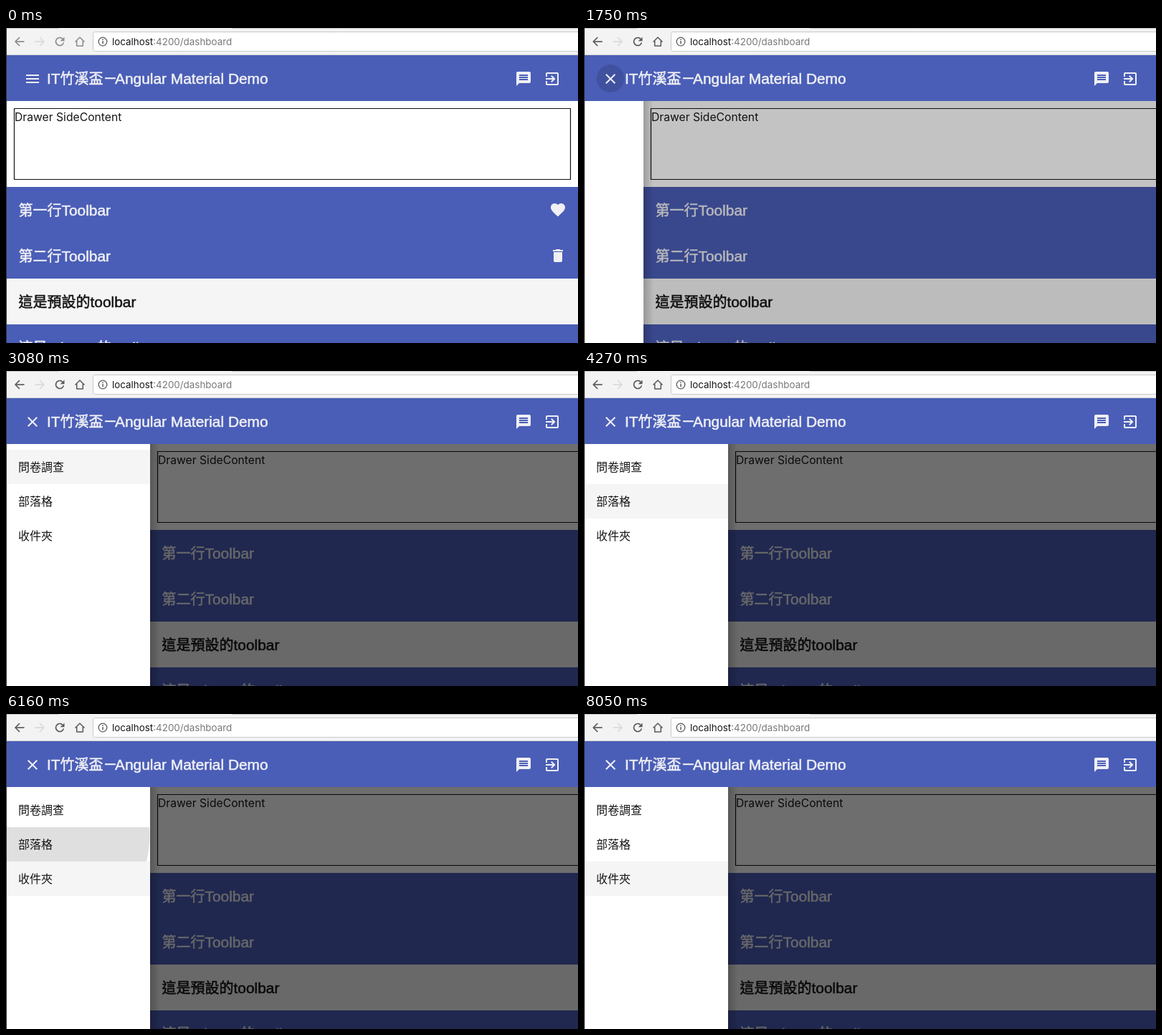
Animation, 798 px wide and 440 px high, one loop 8.12 s. Source, as an HTML page with a canvas:

```html
<!DOCTYPE html>
<html lang="zh-Hant">
<head>
<meta charset="utf-8">
<title>Angular Material Demo</title>
<style>
html, body { margin: 0; width: 100%; height: 100%; overflow: hidden; background: #fff; }
canvas { display: block; }
</style>
</head>
<body>
<canvas id="stage" width="798" height="440"></canvas>
<script>
const ctx = document.getElementById('stage').getContext('2d');
const W = 798, H = 440, LOOP = 8120, STEP = 70;
const BLUE = '#4a5eb7', PALE = '#efeff5', INK = '#161616';
const CJK = '"Noto Sans CJK TC", "Noto Sans CJK", sans-serif';
const SANS = '"Liberation Sans", Arial, sans-serif';
const UI = 'Inter, Roboto, sans-serif';

const ICONS = {
  chat: 'M20 2H4c-1.1 0-2 .9-2 2V22l4-4h14c1.1 0 2-.9 2-2V4c0-1.1-.9-2-2-2zM18 14H6v-2h12zM18 11H6V9h12zM18 8H6V6h12z',
  exit: 'M10.1 15.6L11.5 17l5-5-5-5-1.4 1.4L12.7 11H3v2h9.7zM19 3H5c-1.1 0-2 .9-2 2v4h2V5h14v14H5v-4H3v4c0 1.1.9 2 2 2h14c1.1 0 2-.9 2-2V5c0-1.1-.9-2-2-2z',
  heart: 'M12 21.4l-1.5-1.3C5.4 15.4 2 12.3 2 8.5 2 5.4 4.4 3 7.5 3c1.7 0 3.4.8 4.5 2.1C13.1 3.8 14.8 3 16.5 3 19.6 3 22 5.4 22 8.5c0 3.8-3.4 6.9-8.6 11.5z',
  trash: 'M6 19c0 1.1.9 2 2 2h8c1.1 0 2-.9 2-2V7H6zM19 4h-3.5l-1-1h-5l-1 1H5v2h14z'
};
for (const name in ICONS) ICONS[name] = new Path2D(ICONS[name]);

const ITEMS = ['問卷調查', '部落格', '收件夾'];
const HOVER = [2590, 4130, 6090];

const clamp = v => Math.max(0, Math.min(1, v));

function bezier(x1, y1, x2, y2) {
  const at = (a, b, u) => 3 * a * u * (1 - u) ** 2 + 3 * b * u * u * (1 - u) + u ** 3;
  return x => {
    x = clamp(x);
    if (x === 0 || x === 1) return x;
    let lo = 0, hi = 1;
    for (let i = 0; i < 24; i++) {
      const mid = (lo + hi) / 2;
      if (at(x1, x2, mid) < x) lo = mid; else hi = mid;
    }
    return at(y1, y2, lo);
  };
}
const slide = bezier(.25, .8, .25, 1);
const spread = bezier(0, 0, .2, 1);

function rect(x, y, w, h, fill) {
  ctx.fillStyle = fill;
  ctx.fillRect(x, y, w, h);
}

function line(points, color, width) {
  ctx.beginPath();
  points.forEach(([x, y], i) => i ? ctx.lineTo(x, y) : ctx.moveTo(x, y));
  ctx.strokeStyle = color;
  ctx.lineWidth = width;
  ctx.stroke();
}

function icon(name, x, y) {
  ctx.save();
  ctx.translate(x, y);
  ctx.fillStyle = PALE;
  ctx.fill(ICONS[name], 'evenodd');
  ctx.restore();
}

function text(str, x, y, font, color) {
  ctx.font = font;
  ctx.fillStyle = color;
  ctx.fillText(str, x, y);
  return x + ctx.measureText(str).width;
}

// Medium-weight heading with Latin and Chinese runs
function heading(str, x, y, color) {
  ctx.strokeStyle = color;
  ctx.lineWidth = .55;
  ctx.lineJoin = 'round';
  for (const run of str.match(/[\x20-\x7e]+|[^\x20-\x7e]+/g)) {
    const latin = run.charCodeAt(0) < 128;
    const end = text(run, x, y, latin ? '20.9px ' + SANS : '20px ' + CJK, color);
    ctx.strokeText(run, x, y);
    x = end;
  }
}

// Expands for 450 ms, then fades for 400 ms
function ripple(t, start, x, y, radius, alpha) {
  const dt = t - start;
  if (dt <= 0 || dt >= 850) return;
  ctx.beginPath();
  ctx.arc(x, y, radius * spread(dt / 450), 0, Math.PI * 2);
  ctx.fillStyle = `rgba(0,0,0,${alpha * (1 - clamp((dt - 450) / 400))})`;
  ctx.fill();
}

function browserBar(t) {
  const dark = t < STEP ? '#8c8c8c' : '#5a5a5a';
  rect(0, 0, W, 38, '#f3f3f3');
  rect(0, 0, 74, 1, '#c6c6c6');
  rect(315, 0, W - 315, 1, '#c6c6c6');
  rect(0, 37, W, 1, '#d2d2d2');

  ctx.beginPath();
  ctx.roundRect(121.5, 5.5, 700, 27, 3);
  ctx.fillStyle = '#fff';
  ctx.fill();
  ctx.strokeStyle = '#c9c9c9';
  ctx.lineWidth = 1;
  ctx.stroke();

  for (const [x, dir, color] of [[19, 1, dark], [47, -1, '#dadada']]) {
    line([[x - 6 * dir, 19], [x + 6.5 * dir, 19]], color, 1.7);
    line([[x, 13], [x - 6 * dir, 19], [x, 25]], color, 1.7);
  }

  ctx.beginPath();
  ctx.arc(75, 19, 5.5, .25, Math.PI * 1.75);
  ctx.strokeStyle = dark;
  ctx.lineWidth = 1.7;
  ctx.stroke();
  ctx.beginPath();
  ctx.moveTo(81.5, 12.5);
  ctx.lineTo(81.5, 18.3);
  ctx.lineTo(75.7, 18.3);
  ctx.fillStyle = dark;
  ctx.fill();

  line([[96.5, 19.5], [103, 13], [109.5, 19.5]], dark, 1.5);
  line([[98.7, 18], [98.7, 25], [107.3, 25], [107.3, 18]], dark, 1.5);

  ctx.beginPath();
  ctx.arc(135, 19, 5.8, 0, Math.PI * 2);
  ctx.strokeStyle = '#5a5a5a';
  ctx.lineWidth = 1.3;
  ctx.stroke();
  rect(134.3, 18, 1.5, 4.2, '#5a5a5a');
  rect(134.3, 15.4, 1.5, 1.6, '#5a5a5a');

  const x = text('localhost', 148, 24, '13.4px ' + UI, INK);
  text(':4200/dashboard', x, 24, '13.4px ' + UI, '#777');
}

function header(t, open) {
  rect(0, 38, W, 64, BLUE);
  ctx.save();
  ctx.beginPath();
  ctx.arc(37, 70.5, 20, 0, Math.PI * 2);
  ctx.clip();
  ripple(t, 1600, 37, 70.5, 28.3, .13);
  ctx.restore();

  if (open) {
    line([[30.7, 64.7], [43.3, 77.3]], PALE, 2);
    line([[43.3, 64.7], [30.7, 77.3]], PALE, 2);
  } else {
    for (let i = 0; i < 3; i++) rect(28, 65 + i * 5, 18, 2, PALE);
  }
  heading('IT竹溪盃－', 57, 78, PALE);
  heading('Angular Material Demo', 152, 78, PALE);
  icon('chat', 710, 59);
  icon('exit', 750, 59);
}

function content(shift, dim) {
  ctx.save();
  ctx.translate(shift, 0);
  rect(0, 102, W, 338, '#fff');
  ctx.strokeStyle = '#111';
  ctx.lineWidth = 1.2;
  ctx.strokeRect(11.5, 112.5, 776, 99);
  text('Drawer SideContent', 12, 130, '15.7px ' + UI, INK);

  rect(0, 222, W, 128, BLUE);
  heading('第一行Toolbar', 17.5, 262, PALE);
  heading('第二行Toolbar', 17.5, 326, PALE);
  icon('heart', 758, 242);
  icon('trash', 758, 306);
  rect(0, 350, W, 64, '#f5f5f5');
  heading('這是預設的toolbar', 17.5, 390, INK);
  rect(0, 414, W, 26, BLUE);
  heading('這是primary的toolbar', 17.5, 454, PALE);
  ctx.restore();
  if (dim > 0) rect(0, 102, W, 338, `rgba(0,0,0,${dim})`);
}

function drawer(t, p) {
  const left = 200 * p - 199, right = left + 200;
  const shade = ctx.createLinearGradient(right, 0, right + 14, 0);
  shade.addColorStop(0, 'rgba(0,0,0,.2)');
  shade.addColorStop(1, 'rgba(0,0,0,0)');
  rect(right, 102, 14, 338, shade);
  rect(left, 102, 200, 338, '#fff');

  ITEMS.forEach((label, i) => {
    const top = 110 + i * 48;
    const hovered = t >= HOVER[i] && t < (HOVER[i + 1] || LOOP);
    if (hovered) rect(left, top + 48 - 48, 200, 48, '#f5f5f5');
    if (i === 1) {
      ctx.save();
      ctx.beginPath();
      ctx.rect(left, top, 200, 48);
      ctx.clip();
      ripple(t, 5820, 60, 170, 145.5, .125);
      ctx.restore();
    }
    text(label, left + 16, top + 30, '16px ' + CJK, INK);
  });
}

function draw(t) {
  const p = slide((t - 1699) / 400);
  ctx.clearRect(0, 0, W, H);
  content(200 * p, .57 * p);
  if (p > 0) drawer(t, p);
  header(t, p > 0);
  browserBar(t);
  rect(0, 0, 1, H, '#333');
}

const begin = performance.now();
function frame() {
  const t = (performance.now() - begin) % LOOP;
  draw(Math.floor(t / STEP) * STEP);
  requestAnimationFrame(frame);
}
frame();
</script>
</body>
</html>
```
